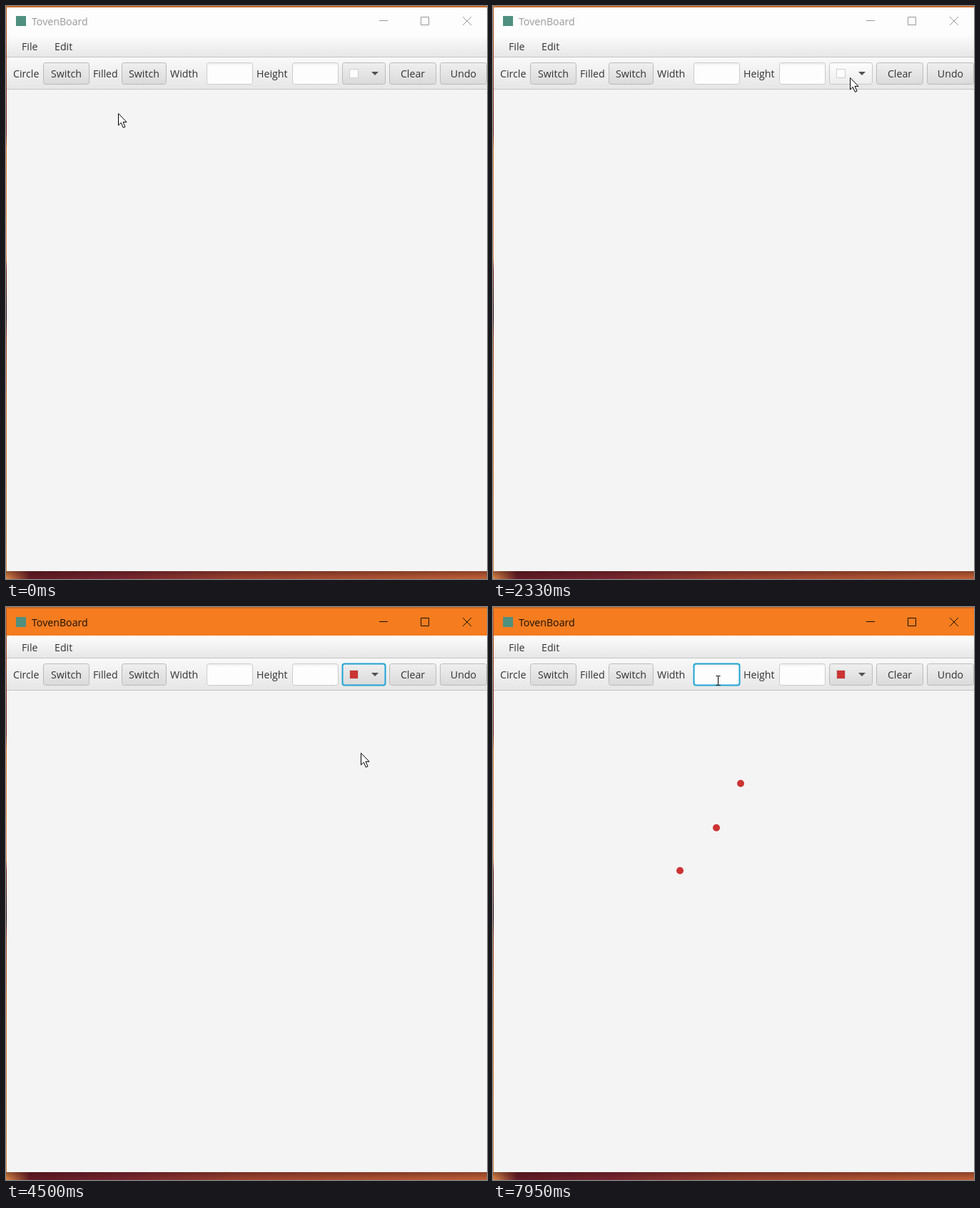
An HTML page that plays this animation: 674 px wide and 802 px high, repeating every 8 s.

```html
<!DOCTYPE html>
<html lang="en">
<head>
<meta charset="utf-8">
<title>Paint window</title>
<style>
  html, body { margin: 0; width: 100%; height: 100%; overflow: hidden; background: #8a3a20; }
  svg { display: block; width: 674px; height: 802px; }
  text { font: 14.2px "Open Sans", "Noto Sans", sans-serif; fill: #333; }
  .control rect { fill: url(#button); stroke: #bababa; }
  .control.hover rect { fill: url(#hover); stroke: #c6c6c6; }
  .field rect { fill: url(#field); stroke: #cbcbcb; }
  .focus > rect:first-child { stroke: #1ea4d4; stroke-width: 2; }
  .frame { --bar: #fdfdfd; --ink: #999; }
  .frame.active { --bar: #f57c1f; --ink: #1a1008; }
  .bar { fill: var(--bar); }
  .title { fill: var(--ink); }
  .icons { fill: none; stroke: var(--ink); }
  #popup { filter: drop-shadow(0 3px 5px rgba(0, 0, 0, .4)); }
</style>
</head>
<body>
<svg viewBox="0 0 674 802">
  <defs>
    <linearGradient id="desk" x2="0" y2="1">
      <stop offset="0" stop-color="#c05a20"/>
      <stop offset=".22" stop-color="#7a2018"/>
      <stop offset=".25" stop-color="#e07828"/>
      <stop offset=".44" stop-color="#e89058"/>
      <stop offset=".46" stop-color="#7a2818"/>
      <stop offset=".54" stop-color="#300c10"/>
      <stop offset=".58" stop-color="#a04020"/>
      <stop offset=".7" stop-color="#d07028"/>
      <stop offset="1" stop-color="#d88840"/>
    </linearGradient>
    <linearGradient id="floor">
      <stop offset="0" stop-color="#e08a48"/>
      <stop offset=".05" stop-color="#621a26"/>
      <stop offset=".25" stop-color="#7a2630"/>
      <stop offset=".5" stop-color="#a04430"/>
      <stop offset="1" stop-color="#c46238"/>
    </linearGradient>
    <linearGradient id="shade" x2="0" y2="1">
      <stop offset="0" stop-color="#301010" stop-opacity=".4"/>
      <stop offset="1" stop-color="#301010" stop-opacity="0"/>
    </linearGradient>
    <linearGradient id="menu" x2="0" y2="1">
      <stop offset="0" stop-color="#fdfdfd"/>
      <stop offset="1" stop-color="#e6e6e6"/>
    </linearGradient>
    <linearGradient id="tools" x2="0" y2="1">
      <stop offset="0" stop-color="#f9f9f9"/>
      <stop offset="1" stop-color="#e6e6e6"/>
    </linearGradient>
    <linearGradient id="button" x2="0" y2="1">
      <stop offset="0" stop-color="#efefef"/>
      <stop offset="1" stop-color="#dadada"/>
    </linearGradient>
    <linearGradient id="hover" x2="0" y2="1">
      <stop offset="0" stop-color="#fdfdfd"/>
      <stop offset="1" stop-color="#ededed"/>
    </linearGradient>
    <linearGradient id="field" x2="0" y2="1">
      <stop offset="0" stop-color="#eee"/>
      <stop offset=".15" stop-color="#fdfdfd"/>
    </linearGradient>
    <linearGradient id="sheet" x2="0" y2="1">
      <stop offset="0" stop-color="#fafafa"/>
      <stop offset=".75" stop-color="#f4f4f4"/>
      <stop offset="1" stop-color="#e2e2e2"/>
    </linearGradient>
  </defs>

  <rect width="674" height="802" fill="url(#desk)"/>
  <rect y="791" width="674" height="11" fill="url(#floor)"/>
  <rect y="791" width="674" height="11" fill="url(#shade)"/>

  <g class="frame" id="frame">
    <rect width="674" height="3" fill="#cc6a28"/>
    <rect class="bar" x="1" y="2" width="673" height="39"/>
    <rect x="14" y="14" width="14" height="14" fill="#4f9080"/>
    <text class="title" x="36" y="27">TovenBoard</text>
    <path class="icons" d="M523 20.5h12M581.5 15.5h11v11h-11zM640 15l12 12M652 15l-12 12"/>
  </g>

  <rect x="1" y="116" width="673" height="675" fill="#f4f4f4"/>
  <rect x="1" y="40" width="673" height="32" fill="url(#menu)"/>
  <rect x="1" y="72" width="673" height="45" fill="url(#tools)"/>
  <path d="M1 71.5h673M1 116.5h673" stroke="#c4c4c8"/>
  <text x="22" y="62">File</text>
  <text x="68" y="62">Edit</text>
  <text x="10" y="100">Circle</text>
  <text x="122" y="100">Filled</text>
  <text x="230" y="100">Width</text>
  <text x="351" y="100">Height</text>
  <g id="controls"></g>
  <rect id="swatch" x="481.5" y="88.5" width="12" height="12" stroke="#d0d0d0"/>
  <path d="M512 92h10l-5 5z" fill="#505050"/>

  <g id="dots" fill="#cc3333"></g>

  <g id="popup">
    <path d="M471.5 111.5h220v247h-215q-5 0-5-5z" fill="url(#sheet)" stroke="#b8b8b8"/>
    <g id="cells"></g>
    <path d="M487 299.5h187" stroke="#d8d8d8"/>
    <text x="532" y="335" text-decoration="underline">Custom Color...</text>
    <rect id="pick" width="24" height="24" stroke="#1ea4d4" stroke-width="2"/>
  </g>

  <path id="arrow" d="M.5 .5V17L4.3 13.4 7.3 20.3 10 19.1 7 12.4H12z" fill="#fff" stroke="#000"/>
  <path id="beam" d="M-3 -6.5h2.5l.5 .5 .5 -.5H3M0 -6V6M-3 6.5h2.5l.5 -.5 .5 .5H3" fill="none" stroke="#000"/>
</svg>

<script>
const LOOP = 8000;
const ACTIVATE = 2440, OPEN = 2540, CHOOSE = 4120, FOCUS_FIELD = 7600;
const RED = '#cc3333';

// time, x, y of points the pointer passes; a repeated point is a rest
const path = [
  [0, 157, 150], [200, 157, 150], [850, 84, 97], [1200, 76, 96], [1580, 102, 99],
  [1700, 104, 99], [2350, 501, 100], [3250, 501, 100], [3910, 585, 177],
  [4040, 576, 181], [4200, 576, 181], [4960, 347, 247], [5130, 347, 247],
  [5450, 314, 306], [5510, 313, 309], [5680, 313, 309], [6080, 262, 369],
  [6350, 262, 369], [6870, 297, 285], [7400, 315, 103], [LOOP, 315, 103]
];
const dots = [[5060, 347, 247], [5580, 313, 309], [6180, 262, 369]];

const $ = id => document.getElementById(id);
function add(parent, tag, attrs, text = '') {
  const node = document.createElementNS('http://www.w3.org/2000/svg', tag);
  for (const key in attrs) node.setAttribute(key, attrs[key]);
  node.textContent = text;
  return parent.appendChild(node);
}
const show = (node, on) => node.style.display = on ? '' : 'none';

function control(x, width, label = '', kind = 'control') {
  const node = add($('controls'), 'g', { class: kind });
  add(node, 'rect', { x: x + .5, y: 79.5, width: width - 1, height: 30, rx: 3 });
  if (label) add(node, 'text', { x: x + width / 2, y: 100, 'text-anchor': 'middle' }, label);
  return { node, x, width };
}
const buttons = [
  control(52, 65, 'Switch'), control(162, 63, 'Switch'),
  control(537, 66, 'Clear'), control(608, 66, 'Undo')
];
const fields = [control(281, 65, '', 'field'), control(401, 65, '', 'field')];
const picker = control(471, 61);

// Palette: a row of greys, then hues that lighten evenly from row to row
const greys = [255, 242, 230, 204, 179, 153, 128, 102, 77, 51, 26, 0];
const hues = [
  [0, 51, 51], [0, 26, 128], [26, 0, 104], [51, 0, 51], [77, 0, 26], [153, 0, 0],
  [153, 51, 0], [153, 77, 0], [153, 102, 0], [153, 153, 0], [102, 102, 0], [0, 51, 0]
];
function cellColor(col, row) {
  const base = row ? hues[col] : Array(3).fill(greys[col]);
  return `rgb(${base.map(v => Math.min(255, v + 25.5 * Math.max(0, row - 1)))})`;
}
for (let row = 0; row < 10; row++)
  for (let col = 0; col < 12; col++)
    add($('cells'), 'rect', {
      x: 487.5 + 16 * col, y: 126.5 + 16 * row, width: 15, height: 15, fill: cellColor(col, row)
    });

const dotNodes = dots.map(([, cx, cy]) => add($('dots'), 'circle', { cx, cy, r: 5 }));

// Speed along one axis at a path point, zero where the pointer rests or turns
function slope(i, axis) {
  const a = path[i - 1], b = path[i], c = path[i + 1];
  if (!a || !c || (b[axis] - a[axis]) * (c[axis] - b[axis]) <= 0) return 0;
  return (c[axis] - a[axis]) / (c[0] - a[0]);
}

function pointer(t) {
  const i = path.findIndex(p => p[0] > t);
  const a = path[i - 1], b = path[i], span = b[0] - a[0], k = (t - a[0]) / span;
  const ease = k * k * (3 - 2 * k);
  return [1, 2].map(axis => a[axis] + (b[axis] - a[axis]) * ease
    + span * k * (1 - k) * ((1 - k) * slope(i - 1, axis) - k * slope(i, axis)));
}

function draw(t) {
  const [x, y] = pointer(t);
  const open = t >= OPEN && t < CHOOSE;
  const over = c => y >= 79 && y < 110 && x >= c.x && x < c.x + c.width;

  $('frame').classList.toggle('active', t >= ACTIVATE);
  for (const b of buttons) b.node.classList.toggle('hover', !open && over(b));
  picker.node.classList.toggle('hover', t < ACTIVATE && over(picker));
  picker.node.classList.toggle('focus', t >= ACTIVATE && t < FOCUS_FIELD);
  fields[0].node.classList.toggle('focus', t >= FOCUS_FIELD);
  $('swatch').setAttribute('fill', t < CHOOSE ? '#fdfdfd' : RED);
  dotNodes.forEach((node, i) => show(node, t >= dots[i][0]));

  show($('popup'), open);
  if (open) {
    const inside = y >= 126 && x >= 487;
    const col = inside ? Math.floor((x - 487) / 16) : 0;
    const row = inside ? Math.floor((y - 126) / 16) : 0;
    $('pick').setAttribute('x', 483 + 16 * col);
    $('pick').setAttribute('y', 122 + 16 * row);
    $('pick').setAttribute('fill', cellColor(col, row));
  }

  const typing = fields.some(over);
  show($('arrow'), !typing);
  show($('beam'), typing);
  const place = `translate(${Math.round(x)} ${Math.round(y)})`;
  $('arrow').setAttribute('transform', place);
  $('beam').setAttribute('transform', `${place} translate(.5 0)`);
}

function tick() {
  draw(performance.now() % LOOP);
  requestAnimationFrame(tick);
}
tick();
</script>
</body>
</html>
```
